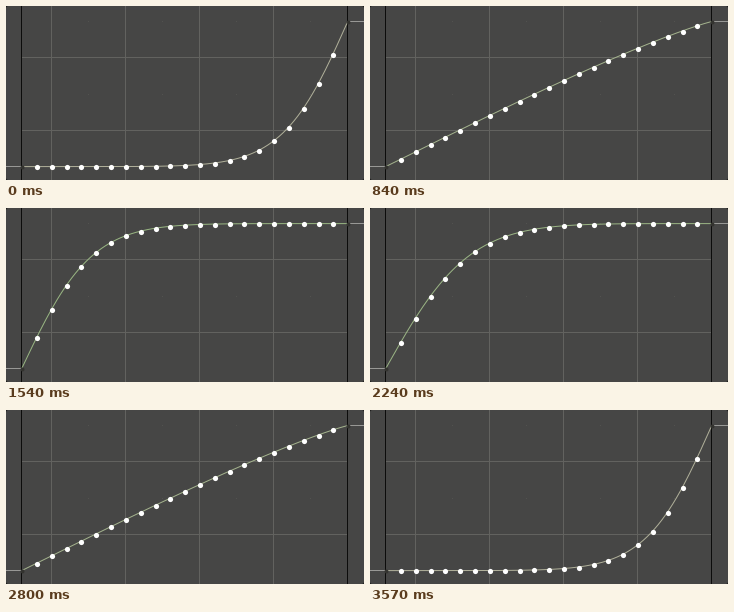
A matplotlib script for the animation above (3.64 s loop, 358x174 px).

```python
import numpy as np
import matplotlib.pyplot as plt
from matplotlib.animation import FuncAnimation
from matplotlib.patches import FancyBboxPatch

WIDTH, HEIGHT, DPI = 358, 174, 100
FRAMES, INTERVAL = 52, 70
PX = 72 / DPI
LEFT, RIGHT, TOP, BOTTOM = 15.7, 341.7, 15.6, 160.6
STEPS = 22

# Dragged tension: positive eases in, negative eases out, zero is linear.
KEY_TIMES = [0, 4, 8, 12, 22, 24, 26, 27, 29, 32, 40, 46, 51]
KEY_TENSIONS = [4.04, 2.98, 1.57, -.115, -3.74, -3.95, -3.95,
                -3.98, -3.98, -2.98, -.115, 2.25, 4.04]


def ease_in(t, power):
    """First half of a symmetric S-curve, scaled to the unit square."""
    a, b = (t / 2) ** power, (1 - t / 2) ** power
    return 2 * a / (a + b)


def ease(t, tension):
    power = 1 + abs(tension)
    return ease_in(t, power) if tension > 0 else 1 - ease_in(1 - t, power)


def to_stage(t, value):
    return np.column_stack([LEFT + t * (RIGHT - LEFT),
                            BOTTOM + value * (TOP - BOTTOM)])


def pixel_centre(points):
    return np.floor(points) + .5


fig = plt.figure(figsize=(WIDTH / DPI, HEIGHT / DPI), dpi=DPI, facecolor="#1c1c1b")
ax = fig.add_axes([0, 0, 1, 1])
ax.set(xlim=(0, WIDTH), ylim=(HEIGHT, 0))
ax.axis("off")
ax.add_patch(FancyBboxPatch((0, 0), WIDTH, HEIGHT, fc="#464645", ec="none",
                            boxstyle="round,pad=0,rounding_size=2.5"))


def stage_line(xs, ys, color):
    ax.plot(xs, ys, color=color, lw=PX, solid_capstyle="butt", snap=False)


def stage_dots(points, size, color):
    return ax.scatter(*np.transpose(points), s=(size * PX) ** 2, color=color,
                      linewidths=0, snap=False, zorder=3)


for x in (45.5, 119.5, 193.5, 267.5):
    stage_line([x, x], [0, HEIGHT], "#62625f")
for y in (51.5, 124.5):
    stage_line([15, 342], [y, y], "#62625f")
for x in (82.5, 156.5, 230.5, 304.5):
    for y in (15.5, 88.5):
        stage_line([x - .5, x + .5], [y, y], "#52524f")
for x in (15.5, 341.5):
    stage_line([x, x], [0, HEIGHT], "#0c0c0b")
stage_line([0, 15], [160.5, 160.5], "#989895")
stage_line([342, WIDTH], [15.5, 15.5], "#989895")

curve, = ax.plot([], [], lw=PX, solid_joinstyle="round", snap=False)
curve_t = np.linspace(0, 1, STEPS * 8 + 1)
dot_t = np.arange(1, STEPS) / STEPS
ends = np.array([0, 1])
stage_dots(pixel_centre(to_stage(ends, ends)), 4, "#33332f")
dots = stage_dots(to_stage(dot_t, dot_t), 5.2, "white")

GREY, GREEN = np.array([176, 176, 154]) / 255, np.array([152, 182, 130]) / 255


def update(frame):
    tension = np.interp(frame, KEY_TIMES, KEY_TENSIONS)
    curve.set_data(*to_stage(curve_t, ease(curve_t, tension)).T)
    mix = np.clip(.5 - tension / 8, 0, 1)
    curve.set_color(GREY + mix * (GREEN - GREY))
    dots.set_offsets(pixel_centre(to_stage(dot_t, ease(dot_t, tension))))
    return curve, dots


anim = FuncAnimation(fig, update, frames=FRAMES, interval=INTERVAL,
                     repeat=True, repeat_delay=0)
plt.show()
```
